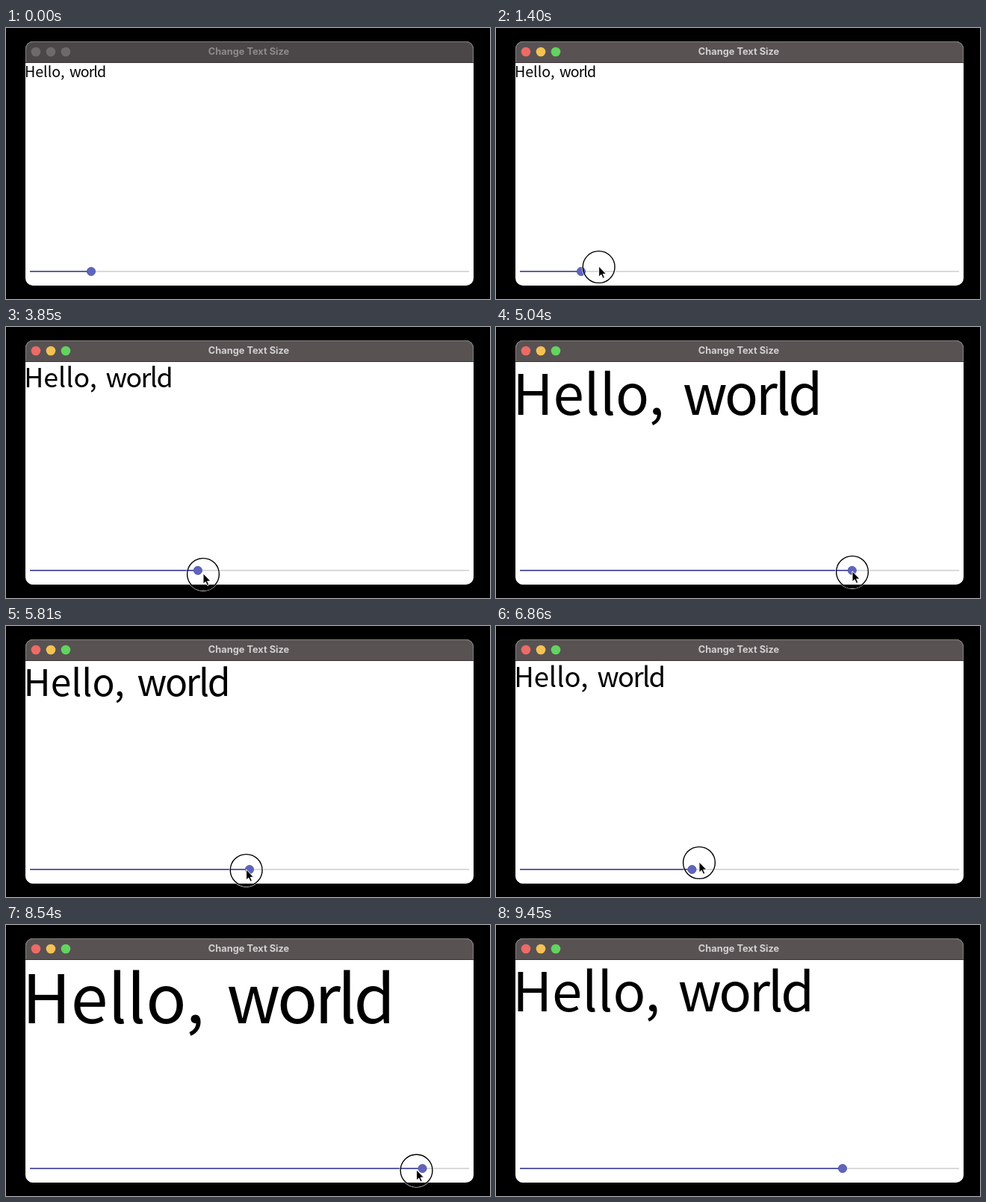
An HTML page that plays this animation: 648x364 px, repeating every 9.94 s.

```html
<!DOCTYPE html>
<html lang="en">
<head>
<meta charset="utf-8">
<title>Change Text Size</title>
<style>
  html, body { margin: 0; width: 100%; height: 100%; overflow: hidden; background: #000; }
  svg { display: block; width: 648px; height: 364px; }
  .title { font: 700 12.8px Inter, "Liberation Sans", sans-serif; text-anchor: middle; }
  .hello { font: 400 98px "Noto Sans CJK JP", "Noto Sans CJK SC", "Noto Sans CJK", "Open Sans", sans-serif; }
</style>
</head>
<body>
<svg viewBox="0 0 648 364" xmlns="http://www.w3.org/2000/svg">
  <defs>
    <clipPath id="frame"><rect x="26" y="18" width="600" height="328" rx="10"/></clipPath>
  </defs>
  <rect width="648" height="364" fill="#000"/>
  <g clip-path="url(#frame)">
    <rect x="26" y="18" width="600" height="328" fill="#fff"/>
    <rect id="bar" x="26" y="18" width="600" height="28"/>
    <rect x="26" y="46" width="600" height="1" fill="#3c3335"/>
    <g id="label" class="hello">
      <text x="-5">Hello,</text>
      <text x="294.5" letter-spacing="-4.4">world</text>
    </g>
  </g>
  <path d="M26.5 46V28a9.5 9.5 0 0 1 9.5-9.5H616a9.5 9.5 0 0 1 9.5 9.5V46" fill="none" stroke="#858081"/>
  <g id="lights">
    <circle cx="40" cy="32" r="6.3"/>
    <circle cx="60" cy="32" r="6.3"/>
    <circle cx="80" cy="32" r="6.3"/>
  </g>
  <text id="title" class="title" x="325" y="36">Change Text Size</text>
  <rect x="32" y="326" width="588" height="2" fill="#d9d9da"/>
  <rect id="fill" x="32" y="326" height="2" fill="#5b5fa8"/>
  <circle id="knob" cy="327" r="5.6" fill="#5f64bd" stroke="#50549f" stroke-width=".8"/>
  <g id="pointer">
    <circle r="22.5" fill="none" stroke="#fff" stroke-opacity=".8"/>
    <circle r="21.4" fill="none" stroke="#000" stroke-width="1.4"/>
    <path d="M0 -1V13.2L3.2 10.3L5.5 15.3L7.8 14.3L5.6 9.4H10Z" fill="#000" stroke="#fff" stroke-linejoin="round"/>
  </g>
</svg>
<script>
  const LOOP = 9940, STEP = 70;
  const SHOW = 280, ACTIVE = 770, GRAB = 2030, HIDE = 9450;
  const KNOB_LAG = 30, TEXT_LAG = 60;
  const $ = id => document.getElementById(id);

  // Where the pointer turns or rests
  const path = [
    { t: 280, x: 157, y: 334 }, { t: 630, x: 151, y: 322 },
    { t: 1470, x: 137, y: 321 }, { t: 2590, x: 131, y: 325 },
    { t: 2800, x: 98, y: 325 }, { t: 3220, x: 175, y: 326 },
    { t: 3500, x: 175, y: 326 }, { t: 3850, x: 264, y: 332 },
    { t: 5040, x: 477, y: 329 }, { t: 5600, x: 352, y: 329 },
    { t: 6720, x: 236, y: 318 }, { t: 6860, x: 272, y: 318 },
    { t: 7840, x: 588.5, y: 333 }, { t: 8260, x: 596, y: 335 },
    { t: 8960, x: 464, y: 320 }, { t: 9380, x: 464, y: 336 }
  ];
  const last = path.length - 1;

  const slope = (i, k) => (path[i + 1][k] - path[i][k]) / (path[i + 1].t - path[i].t);

  function tangent(i, k) {
    if (i === 0 || i === last) return 0;
    const a = slope(i - 1, k), b = slope(i, k);
    return a * b <= 0 ? 0 : 2 * a * b / (a + b);
  }

  // Smooth curve through the points, without overshoot
  function at(t, k) {
    if (t <= path[0].t) return path[0][k];
    if (t >= path[last].t) return path[last][k];
    const i = path.findIndex(p => p.t > t) - 1;
    const p = path[i], q = path[i + 1], d = q.t - p.t;
    const u = (t - p.t) / d, v = 1 - u;
    return p[k] * (1 + 2 * u) * v * v + tangent(i, k) * d * u * v * v
      + q[k] * (3 - 2 * u) * u * u - tangent(i + 1, k) * d * u * u * v;
  }

  function drawWindow(active) {
    $("bar").setAttribute("fill", active ? "#585253" : "#4b4647");
    $("title").setAttribute("fill", active ? "#d2cfd0" : "#8e8a8b");
    ["#ec6b66", "#f4c253", "#62d45f"].forEach((color, i) =>
      $("lights").children[i].setAttribute("fill", active ? color : "#6e696a"));
  }

  function drawSlider(x) {
    $("knob").setAttribute("cx", x);
    $("fill").setAttribute("width", x - 32);
  }

  function drawLabel(size) {
    $("label").setAttribute("transform", `translate(26 ${47 + 0.93 * size}) scale(${size / 100})`);
  }

  function drawPointer(t) {
    $("pointer").setAttribute("visibility", t >= SHOW && t < HIDE ? "visible" : "hidden");
    $("pointer").setAttribute("transform", `translate(${at(t, "x")} ${at(t, "y")})`);
  }

  function draw(ms) {
    const t = Math.floor(ms % LOOP / STEP) * STEP;
    const dragged = t >= GRAB;
    drawWindow(t >= ACTIVE);
    drawSlider(dragged ? at(t - KNOB_LAG, "x") : 114);
    drawLabel(dragged ? (at(t - TEXT_LAG, "x") - 38) / 5.76 : 20);
    drawPointer(t);
  }

  const start = performance.now();
  function tick() {
    draw(performance.now() - start);
    requestAnimationFrame(tick);
  }
  tick();
</script>
</body>
</html>
```
